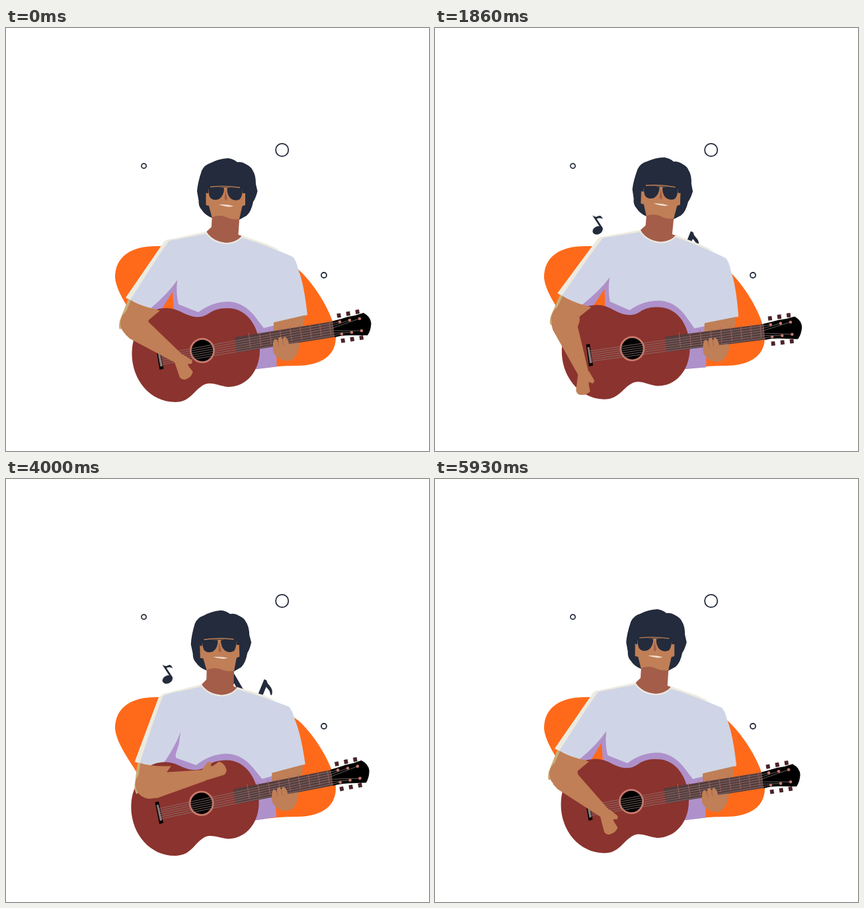
An HTML page with a canvas for the animation above (6000 ms loop, 640 px wide and 640 px high).

```html
<!DOCTYPE html>
<html>
<head>
<meta charset="utf-8">
<title>Guitar player</title>
<style>
html, body { margin: 0; width: 100%; height: 100%; overflow: hidden; background: #fff; }
canvas { display: block; width: 100vmin; height: 100vmin; }
</style>
</head>
<body>
<canvas id="stage" width="640" height="640"></canvas>
<script>
const ctx = document.getElementById('stage').getContext('2d');
const LOOP = 6000, STEP = LOOP / 84, RAD = Math.PI / 180;
const INK = '#232b3c', SKIN = '#c07f56', SHADE = '#a45d49', SHIRT = '#cfd5e6',
  PURPLE = '#ae91cb', CREAM = '#edeadf', WOOD = '#8b332e', ROSE = '#c97a6c';

// Keys are [time, value] pairs, eased in and out between neighbours.
const SWAY = [[0, 0], [670, -2.2], [2080, 2.2], [3748, -2.2], [5230, 2.2], [6000, 0]];
const UPPER = [[250, 0], [850, 1], [1500, 0], [1930, 0], [2550, 1], [3200, 0],
  [3550, 0], [4200, 1], [5000, 0]];
const FORE = [[-750, 0], [850, 1], [1480, 0], [1850, 0], [2590, 1], [3200, 0],
  [3450, 0], [4100, 1], [4930, 0], [5250, 0], [6850, 1]];
const WRIST = [[0, 29], [860, -16], [1650, 21], [1950, 23], [2680, -16], [3250, 23],
  [3500, 24], [4150, -16], [4900, 20], [6000, 29]];

function at(keys, t) {
  if (t <= keys[0][0]) return keys[0][1];
  for (let i = 1; i < keys.length; i++) {
    const [t0, a] = keys[i - 1], [t1, b] = keys[i];
    if (t <= t1) return a + (b - a) * (1 - Math.cos(Math.PI * (t - t0) / (t1 - t0))) / 2;
  }
  return keys[keys.length - 1][1];
}

function shape(d, color) {
  ctx.fillStyle = color;
  ctx.fill(new Path2D(d));
}

function line(d, color, width) {
  ctx.strokeStyle = color;
  ctx.lineWidth = width;
  ctx.stroke(new Path2D(d));
}

function disc(x, y, rx, color, ry = rx, turn = 0) {
  ctx.fillStyle = color;
  ctx.beginPath();
  ctx.ellipse(x, y, rx, ry, turn * RAD, 0, 7);
  ctx.fill();
}

function ring(x, y, r, color, width) {
  ctx.strokeStyle = color;
  ctx.lineWidth = width;
  ctx.beginPath();
  ctx.arc(x, y, r, 0, 7);
  ctx.stroke();
}

function turn(x, y, deg) {
  ctx.translate(x, y);
  ctx.rotate(deg * RAD);
  ctx.translate(-x, -y);
}

function group(draw) {
  ctx.save();
  draw();
  ctx.restore();
}

function backdrop() {
  shape('M165 378C165 345 190 330 228 330C300 330 390 325 443 366C470 390 499 440 499 468' +
    'C499 500 470 511 440 511C410 511 395 514 370 517C300 525 230 520 212 475' +
    'C205 445 168 409 165 378Z', '#ff6a1a');
  ring(417.7, 184.5, 9.6, INK, 1.8);
  ring(208.6, 208.7, 3.6, INK, 1.7);
  ring(481, 374, 4, INK, 1.8);
}

function pairNote() {
  shape('M231 161Q229 155 234 152L273 128Q280 125 284 131L305 167Q309 174 303 180L290 176' +
    'L296 169L285 147L247 169L267 203Q270 210 262 218L250 212L253 201Z', INK);
  disc(250, 213.5, 19, INK, 12.5, -30);
  disc(290, 177.5, 17, INK, 11, -28);
}

function smallNote() {
  disc(246, 306, 8, INK, 6, -25);
  shape('M238 283.5Q243 287 247 284.5Q251 282 254 289Q250 286 244.5 288.5L254 303L252 307L250 302Z', INK);
}

function flagNote() {
  disc(411, 285, 12.2, INK, 9, 18);
  shape('M430.5 254.5L434 256Q435 261 438.5 264Q445 271 441.5 279Q439.5 278 439 273' +
    'Q437 270 433.5 266L422 294L416 290Z', INK);
}

// Each note rises twice; "t0" is when it stands at its drawn place.
const NOTES = [
  { draw: pairNote, t0: 3290, vx: -38 / 860, vy: -102 / 860, from: 1500, fade: 3600, to: 3840 },
  { draw: smallNote, t0: 1860, vx: -15 / 570, vy: -24 / 570, from: 950, fade: 2280, to: 2620 },
  { draw: flagNote, t0: 2632, vx: 32 / 570, vy: -39 / 570, from: 1300, fade: 2800, to: 3100 }
];

function notes(t) {
  for (const n of NOTES) for (const lag of [0, 2078]) {
    const u = t - lag;
    if (u < n.from || u >= n.to) continue;
    group(() => {
      ctx.globalAlpha = Math.min(1, (n.to - u) / (n.to - n.fade));
      ctx.translate(n.vx * (u - n.t0), n.vy * (u - n.t0));
      n.draw();
    });
  }
}

function head() {
  shape('M289 247Q290 234 296 216Q300 207 310 204Q321 198 336 197Q344 198 350 203Q357 202 363 206' +
    'Q371 210 373 215Q378 222 378 236L380.5 247Q378 257 374 263Q371 278 364 284L353 290L311 287' +
    'Q301 283 296 275Q291 270 291.5 261Z', INK);
  shape('M312 280L310.5 307L303 309C312 327 344 333 357 315L351.5 313L353.5 282Z', SHADE);
  shape('M306 243Q331 236 358 243L358 250L362 250L362 268L357.5 269.5L353 289Q342 291 333 286' +
    'Q322 282 311.5 286.5L307 269L302.5 268L302.5 249L306 250Z', SKIN);
  line('M304 250L306 242Q331 238.5 358 242L361 250', INK, 1.6);
  shape('M306.5 242Q318 240 330 242Q330 254 322 259Q313 262 308.5 256Q306 250 306.5 242Z', INK);
  shape('M334.5 242Q346 240 358 242Q358 254 354 259Q347 263 340 258Q334 252 334.5 242Z', INK);
  line('M309 240.5Q331 238 354 241.5', SKIN, 1.3);
  shape('M332 245L334.8 258L332.5 261.5L330.5 258Z', SHADE);
  shape('M322 267.2Q333 266.4 344 269.2Q341 271 335 270.2Q328 269.2 322 267.2Z', '#f3dfd8');
}

function torso() {
  shape('M259 382L252 399L254 428L300 470L376 516.5L409.5 512.5L409 450L390 440L370 405L270 400Z', PURPLE);
  shape('M303 308L242 321L250 330L306 322ZM356 313.5L395 327L415 336L380 330L355 322Z', CREAM);
  shape('M304 311L247 322L240 350L259 382Q257 402 261 418L291 430Q312 414 337 414' +
    'Q360 415 377 437L390 454L406 450L456 434Q451 388 442.5 366Q438 349 433.5 346' +
    'Q395 329 356 317L333 326Z', SHIRT);
  line('M303 309C312 327 344 333 357 315', CREAM, 2.2);
  shape('M303.5 308C313 326 344 331 356.5 314.5L351.5 313L340 300L312 300Z', SHADE);
}

function guitar() {
  shape('M205 450Q212 426 238 424Q252 422 270 432Q291 442 305 433Q318 423 336 424' +
    'C366 424 384 454 384 487C384 520 363 543 336 543C320 541 312 535 301 539C284 547 280 566 256 566' +
    'C218 566 190.5 532 190.5 493Q190.5 466 205 450Z', WOOD);
  disc(297, 488, 17, '#000');
  ring(297, 488, 17.6, ROSE, 2.8);
  shape('M227 484L232.5 483L238.5 515.5L232.5 517Z', '#000');
  shape('M229 488L232 487.5L237 511.5L233.5 512.5Z', '#857a78');
  shape('M405 445.5L452.5 434.5L450 455L443 485Q439 503 425 503.5Q411 503 404.5 490Z', SKIN);
  shape('M346 468L494 444L497.5 467.5L349 491Z', '#553c3c');
  shape('M494 443.5Q508 440 517 437Q530 435 541 431Q552 437 552.5 447Q552 458 547 465L520 465' +
    'Q506 465 497.5 468Z', '#000');
  for (let i = 0; i < 6; i++)
    line(`M${231 + i} ${494 + i * 3}L${494.5 + i * 0.5} ${446.5 + i * 3.7}`, '#8d7774', 0.8);
  for (let i = 0; i < 9; i++) {
    const x = 367 + 16 * i - i * i * 0.1, y = 468 - (x - 346) * 0.162;
    line(`M${x} ${y - 3.5}L${x + 3} ${y + 19.5}`, '#a86a60', 0.8);
  }
  for (let i = 0; i < 3; i++) {
    const x = 505 + 15 * i, y = 444.5 - 2.4 * i;
    line(`M494 ${447 + 3.5 * i}L${x} ${y}M497 ${465 - 3.5 * i}L${x + 3} ${y + 18.4}`, '#807574', 0.8);
    disc(x, y, 2.3, ROSE);
    disc(x + 3, y + 18.4, 2.3, ROSE);
    for (const [px, py] of [[503.7 + 14 * i, 435 - 2.8 * i], [509.8 + 14 * i, 473 - 2.2 * i]])
      group(() => {
        turn(px, py, -9);
        ctx.fillStyle = '#4a2429';
        ctx.fillRect(px - 2.9, py - 3.2, 5.8, 6.4);
      });
  }
  shape('M404.5 490Q403 478 405 473Q407 469 410 472L412 475Q411 468 415 467.5Q418 468 419 473' +
    'Q419 466 423 467.5Q427 471 428 478L442 476L440 492Q435 504 424 503.5Q411 502 404.5 490Z', SKIN);
  line('M411 474L413 481M418.5 473L420 480', '#9c6444', 0.8);
}

function sleeve() {
  shape('M245 320L240 322L181 408L188 412L230 360L252 324Z', CREAM);
  shape('M259.5 381L252 399L234 428L217 423L240 385Z', PURPLE);
  shape('M247 322Q235 337 188 411.5Q200 419 219 424Q245 402 259.5 381L276 340L270 320Z', SHIRT);
}

function arm(t) {
  shape('M185 410L172 443Q170 452 172 456L185 450L193 414Z', '#c8ad79');
  shape('M189 412Q203 421 233 427.5L214 443.5L205 462L177 455Q174 446 179 435Z', SKIN);
  disc(194.5, 446.5, 21.5, SKIN);
  ctx.translate(193, 446);
  ctx.rotate((68 - 68 * at(FORE, t)) * RAD);
  shape('M0 21.5L10 22.5L86 10L92 -6L15 -15L0 -20Z', SKIN);
  ctx.translate(87, 2);
  ctx.rotate(at(WRIST, t) * RAD);
  shape('M-5 6L1 7.5L27 9.5Q34 7 33 0Q33 -7 27 -12L17 -9.5L13 -9.5L15 -15Q13 -18 10 -17.5' +
    'L-3 -9Z', SKIN);
}

function draw(t) {
  ctx.fillStyle = '#fff';
  ctx.fillRect(0, 0, 640, 640);
  backdrop();
  notes(t);
  const lift = () => turn(255, 335, -15.6 * at(UPPER, t));
  group(() => {
    turn(380, 530, at(SWAY, t));
    head();
    torso();
    group(() => { lift(); sleeve(); });
    guitar();
    group(() => { lift(); arm(t); });
  });
}

const start = performance.now();
function tick(now) {
  const t = Math.max(0, now - start) % LOOP;
  draw(Math.floor(t / STEP + 0.1) * STEP % LOOP);
  requestAnimationFrame(tick);
}
draw(0);
requestAnimationFrame(tick);
</script>
</body>
</html>
```
